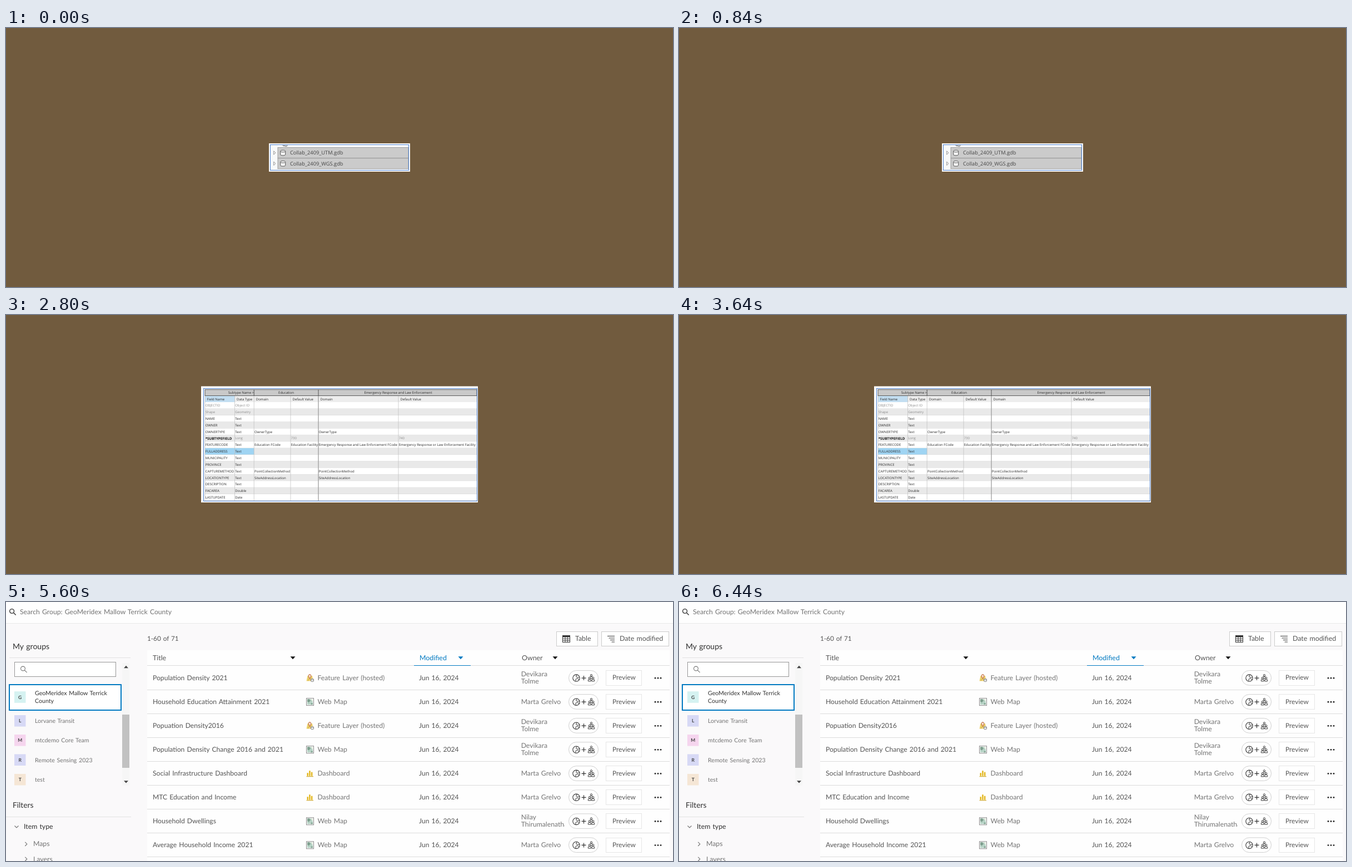
An HTML page for the animation above (7000 ms loop, 1200x467 px).

```html
<!DOCTYPE html>
<html lang="en">
<head>
<meta charset="utf-8">
<title>Geodatabase walkthrough</title>
<style>
html, body { margin: 0; width: 100%; height: 100%; overflow: hidden; background: #715b3e; }
svg { display: block; width: 1200px; height: 467px; }
text { white-space: pre; text-rendering: geometricPrecision; }
.ui { font-family: "Open Sans", "Noto Sans", sans-serif; }
.web { font-family: Lato, Inter, sans-serif; word-spacing: 1px; }
</style>
</head>
<body>
<svg id="stage" viewBox="0 0 1200 467"></svg>
<script>
const STEP = 1400;
const BLUE = '#4a7dcb', INK = '#2b2b2b';

const box = (x, y, x2, y2, fill, stroke = 'none', w = 1, r = 0) =>
  `<rect x="${x}" y="${y}" width="${x2 - x}" height="${y2 - y}" rx="${r}" fill="${fill}" stroke="${stroke}" stroke-width="${w}"/>`;
const path = (d, stroke = INK, w = 1, fill = 'none') =>
  `<path d="${d}" fill="${fill}" stroke="${stroke}" stroke-width="${w}"/>`;
const dot = (x, y, r, fill, stroke = 'none', w = 1) =>
  `<circle cx="${x}" cy="${y}" r="${r}" fill="${fill}" stroke="${stroke}" stroke-width="${w}"/>`;
// y is the middle of the capitals
const text = (x, y, s, size, fill = INK, more = '') =>
  `<text x="${x}" y="${y + size * 0.36}" font-size="${size}" fill="${fill}" ${more}>${s}</text>`;
const at = (x, y, inner) => `<g transform="translate(${x} ${y})">${inner}</g>`;
const lines = (xs, y, y2, color, w = 0.6) =>
  xs.map(x => path(`M${x} ${y}V${y2}`, color, w)).join('');

function cylinder(x, y, s = 1) {
  return at(x, y, `<g transform="scale(${s})">` +
    path('M-4.5 -3V3.2C-4.5 5.4 4.5 5.4 4.5 3.2V-3', '#555', 1, '#f4f4f4') +
    '<ellipse cy="-3" rx="4.5" ry="1.7" fill="#fff" stroke="#555"/></g>');
}

function fileList() {
  const row = (y, name) =>
    box(489, y - 9.6, 724, y + 9.4, '#cbcbcb', '#9b9b9b') +
    path(`M481.7 ${y - 3.2}V${y + 3.2}L485 ${y}Z`, '#8a8a8a', 0.9, '#fff') +
    cylinder(498.2, y) + text(511, y, name, 9.25, '#444');
  return box(473, 208, 727, 259, '#fff') +
    box(476, 211, 489, 256, '#f8f9f9') +
    path('M498.5 211V212.6H502M502 211V213.2H505.5V211', '#666', 1) +
    row(225, 'Collab_2409_UTM.gdb') + row(244.4, 'Collab_2409_WGS.gdb') +
    box(475.5, 210.5, 724.5, 256.5, 'none', BLUE);
}

function domainTable() {
  const cols = [365, 375, 494.5, 617, 660.5, 733, 768, 836];
  const heads = ['Domain Name', 'Description', 'Field Type', 'Domain Type', 'Split Policy', 'Merge Policy'];
  const rows = [
    ['Building General FCode', 'The type of residential facility'],
    ['Education FCode', 'The type of educational facility'],
    ['Emergency Response and Law Enforcement FCode', 'The type of emergency response or law|enforcement facility'],
    ['Government and Military FCode', 'The type of government or military facility'],
    ['Health and Medical FCode', 'The type of health or medical facility'],
    ['Mail and Shipping FCode', 'The type of mail or shipping facility'],
    ['OwnerType', 'The type of owner', 'Text', 'Duplicate'],
    ['PointCollectionMethod', 'The collection method for a point feature', 'Text', 'Duplicate'],
    ['Public Attractions and Landmark Structures FCode', 'The type of public attraction or landmark'],
    ['SiteAddressLocation', 'A general description of the physical location|represented by the site address point', 'Text', 'Duplicate'],
    ['Street Class', 'The street class for the road network', 'Short'],
    ['Street Rank', 'The street rank for the road network', 'Short'],
    ['Transportation Facilities FCode', 'The type of transportation facility']
  ];
  let out = box(359.5, 141.3, 841, 325, '#fff') + box(362.5, 144.5, 836.5, 322, '#efefef') +
    box(367.5, 149.5, 374.5, 156.5, '#dfe9df', '#8a9a94', 0.7) + path('M369 155L371 151L374 154', '#6f9c7c', 0.8) +
    text(377, 153.3, 'Map', 5.2) +
    box(398.5, 148, 487, 158, '#0a79cb') + box(363, 157.2, 836, 158.4, '#0a79cb') +
    box(401.5, 150, 405, 153.5, '#cfe3f3', '#fff', 0.5) + box(404, 152, 408, 156, '#b9d5ec', '#fff', 0.5) +
    text(410, 153.3, 'Domains: Collab_2409_UTM', 5, '#fff') +
    path('M479.8 151.3l4 4m0 -4l-4 4', '#fff', 0.8) +
    path('M372.6 164V167.2H369.4Z', 'none', 0, '#555');
  heads.forEach((h, i) => out += text(cols[i + 1] + 3, 164.4, h, 5.05));
  let y = 169.2;
  rows.forEach(([name, note, type = 'Text', split = 'Default'], i) => {
    const parts = note.split('|');
    const h = parts.length > 1 ? 15.9 : 9.93, mid = y + h / 2;
    out += box(365, y, 375, y + h, i ? '#ebebeb' : '#c9c9c9') +
      box(375, y, 836, y + h, i ? (i % 2 ? '#e9e9e9' : '#fff') : '#9fd4f3') +
      path(`M365 ${y + h}H836`, '#d0d0d0', 0.5) + text(375.8, mid, name, 5);
    parts.forEach((p, k) => out += text(495, mid + (k - (parts.length - 1) / 2) * 7, p, 5.02));
    [type, 'Coded Value Domain', split, 'Default'].forEach((s, k) => out += text(cols[k + 3] + 0.9, mid, s, 5));
    y += h;
  });
  return out + box(365, y, 836, 319.8, '#e9e9e9') + path('M365 319.8H836', '#c8c8c8', 0.6) +
    lines(cols.slice(0, 7), 159, 319.8, '#cbcbcb') +
    box(362.5, 144.5, 836.5, 322, 'none', BLUE);
}

function subtypeTable() {
  const cols = [358, 411.5, 446.2, 512, 562, 706];
  const faint = '#8c8c8c', h = 11.84, top = 157.2;
  const rows = [
    'OBJECTID,Object ID', 'Shape,Geometry', 'NAME,Text', 'OWNER,Text',
    'OWNERTYPE,Text,OwnerType,,OwnerType', '*SUBTYPEFIELD,Long,,730,,740',
    'FEATURECODE,Text,Education FCode,Education Facility,Emergency Response and Law Enforcement FCode,Emergency Response or Law Enforcement Facility',
    'FULLADDRESS,Text', 'MUNICIPALITY,Text', 'PROVINCE,Text',
    'CAPTUREMETHOD,Text,PointCollectionMethod,,PointCollectionMethod',
    'LOCATIONTYPE,Text,SiteAddressLocation,,SiteAddressLocation',
    'DESCRIPTION,Text', 'FACAREA,Double', 'LASTUPDATE,Date'
  ];
  let out = box(351, 128.5, 849, 338, '#fff') +
    box(358, 134.5, 847, 145.5, '#c9c9c9', '#5c5c5c', 1) + lines([446.2, 562], 134, 146, '#555', 1) +
    text(446, 139.8, 'Subtype Name &gt;', 6, INK, 'text-anchor="end"') +
    text(504, 139.8, 'Education', 6, INK, 'text-anchor="middle"') +
    text(705.5, 139.8, 'Emergency Response and Law Enforcement', 6, INK, 'text-anchor="middle"') +
    box(358, 146, 847, top, '#ededed') + box(358, 146, 411.5, top, '#c3def1');
  ['Field Name', 'Data Type', 'Domain', 'Default Value', 'Domain', 'Default Value']
    .forEach((s, i) => out += text(cols[i] + 3.6, 151.4, s, 6));
  rows.forEach((row, i) => {
    const y = top + i * h;
    out += box(358, y, 847, y + h, i % 2 ? '#e9e9e9' : '#fff');
    if (i === 7) out += box(358, y, 446.2, y + h, '#9fd4f3');
    out += path(`M358 ${y + h}H847`, '#c6c6c6', 0.6);
    row.split(',').forEach((s, k) => {
      const bold = s[0] === '*';
      const color = i < 2 || (i === 5 && !bold) ? faint : bold ? '#111' : INK;
      out += text(cols[k] + 0.7, y + h / 2, s, bold ? 6.25 : 6, color, bold ? 'font-weight="700"' : '');
    });
  });
  return out + lines(cols, 146, top + 15 * h, '#bdbdbd', 0.7) + lines([562], 146, 334.8, '#8f8f8f', 0.9) +
    box(355.5, 132.5, 847.5, 335.5, 'none', BLUE);
}

function tree() {
  // kind: d database, g group, a area, p points, l lines
  const rows = `d Collab_2409_UTM.gdb|g Broadband|a Vond|a Tulvex|p Data_Center|l RoadsCombinedCurrent|g Transit|p Orvane_Stops|l PotentialOnDemandRoute|p PotentialTransitStop|l Routes_Orvane|l Summer_Route|p Summer_Route_Stops|l Transit_FixedRoute|p Transit_FixedStops|l Transit_OnDemandRoute|l Transit_OnDemandRoute_ToBrenwick|p Transit_OnDemandStop|p Transit_OnDemandStop_ToBrenwick`.split('|');
  const frame = box(-5.2, -4.6, 5.2, 4.6, '#fbfcfc', '#666', 0.9, 1.2);
  const icons = {
    g: box(-5.5, -4.5, 0.5, 1, '#fff', '#555', 0.9) + box(-0.5, -2, 5.5, 3, '#fff', '#555', 0.9) + box(-3.5, 1, 1, 4.7, '#fff', '#555', 0.9),
    a: frame + box(-2.8, -2.4, 2.8, 2.4, '#ddd', '#555', 0.9) + path('M-2.8 0H0V-2.4M0 0V2.4', '#555', 0.7),
    p: frame + dot(-2.2, -1.5, 0.75, '#555') + dot(2.2, -1.2, 0.75, '#555') + dot(0, 1.9, 0.75, '#555'),
    l: frame + path('M-3.4 0.6H3.4M-3.4 0.6L-1 -2M3.4 0.6L1 2.6', '#555', 0.9)
  };
  let out = box(427, 69, 772.5, 398, '#fff') + box(430, 73, 770, 397, '#f7f9f9') +
    box(449.7, 74.3, 770, 90.8, '#c6dcee', '#5b9bd1');
  rows.forEach((row, i) => {
    const kind = row[0], y = 82.7 + i * 16.935;
    const x = kind === 'd' ? 458 : kind === 'g' ? 469.3 : 480.7;
    if ('dg'.includes(kind)) out += path(`M${x - 12} ${y - 2.6}V${y + 2.4}H${x - 17}Z`, 'none', 0, '#444');
    out += kind === 'd' ? cylinder(x, y, 0.9) : at(x, y, icons[kind]);
    out += text(x + 11.3, y, row.slice(2) + (kind === 'd' ? '' : '_NAD1983'), 8.02, '#444');
  });
  return out + box(430.5, 72.5, 770, 397, 'none', '#5f97d3');
}

function portal() {
  const ink = '#545454', mute = '#747474', dark = '#303030', rule = '#dcdcdc', link = '#0079c1';
  const group = 'GeoMeridex Mallow Terrick';
  const lens = (x, y, c, w) => dot(x, y, 3.9, 'none', c, w) + path(`M${x + 2.8} ${y + 2.8}l4.3 4.3`, c, w);
  const caret = (x, y, c = '#151515') => path(`M${x - 4.5} ${y - 2.2}h9l-4.5 5z`, 'none', 0, c);
  const chevron = d => path(d, mute, 1.1);

  const types = {
    'Feature Layer (hosted)': path('M-6.5 5.5L-4.5 -4L0 -3L4 -4L5.5 5.5Z', 'none', 0, '#ecd06a') +
      path('M-4 5L-1 1L3 3', '#c2a04a', 0.8) +
      path('M-0.5 1.5C-4.2 -3 -3 -6.5 -0.5 -6.5S3.2 -3 -0.5 1.5Z', '#b0663f', 0.9, '#f0b58f') + dot(-0.5, -3.6, 1.2, '#fff') +
      box(1.5, 1.5, 6.5, 6.5, '#fff', '#777', 0.9, 1.5) + path('M1.5 3.5H6.5', '#777', 0.8),
    'Web Map': box(-6.5, -6.5, 6.5, 6.5, '#fff', '#8a8a8a', 1) + box(-5, -5, 5, 5, '#b7d3c6') +
      path('M-5 -5H-1L1 -2L-2 1L-5 0ZM1 5L3 2L5 3V5Z', 'none', 0, '#7fa08f') + path('M1 -5L5 0V-5Z', 'none', 0, '#e4ecdf'),
    'Dashboard': box(-5.5, -1, -3, 4.5, '#e3b71f') + box(-1.8, -5, 0.7, 4.5, '#e3b71f') +
      box(1.9, -2.5, 4.4, 4.5, '#e3b71f') + path('M-6.5 5.5H6', '#c99d12', 1)
  };
  const person = (x, y) => dot(x, y, 1.7, '#fff', '#333', 1) +
    path(`M${x - 2.5} ${y + 5.6}V${y + 4}a2.5 2 0 0 1 5 0V${y + 5.6}Z`, '#333', 1, '#fff');
  const share = box(-26.5, -13, 26.5, 13.5, '#fff', '#cfcfcf', 1, 13.2) +
    dot(-13, 0.5, 6.2, '#fff', '#333', 1.1) +
    path('M-12 -5.5L-13.5 -2L-10.5 -0.5L-7 -1', '#333', 1) +
    path('M-14 6V2.5L-11 1L-8 3.5', '#333', 1) +
    path('M-3.5 0.5H4.5M0.5 -3.5V4.5', '#333', 1.2) +
    person(14, -4.3) + person(10.8, 0.5) + person(17.2, 0.5);

  const a = 'Devikara|Tolme', b = 'Marta Grelvo', c = 'Nilay|Thirumalenathan';
  const [layer, map, dash] = Object.keys(types);
  const items = [
    ['Population Density 2021', layer, a], ['Household Education Attainment 2021', map, b],
    ['Popuation Density2016', layer, a], ['Population Density Change 2016 and 2021', map, a],
    ['Social Infrastructure Dashboard', dash, b], ['MTC Education and Income', dash, b],
    ['Household Dwellings', map, c], ['Average Household Income 2021', map, b]
  ];

  let out = box(0, 0, 1200, 467, '#faf9fa') + box(0, 0, 1200, 39, '#fefefe') + path('M0 38.5H1200', '#e9e9e9') +
    lens(10.6, 16.5, '#333', 1.4) + text(25, 17.3, `Search Group: ${group} County`, 12.2, mute) +
    text(12, 79.5, 'My groups', 14, dark) + path('M6 100.5H224', '#e2e2e2') +
    box(15.5, 108.5, 197.5, 134.5, '#fff', '#979797') + lens(30.5, 120, mute, 1.1) +
    box(209, 110, 222, 331, '#f6f6f6') + box(209, 203, 222, 299, '#c1c1c1') +
    path('M212 119.2h8l-4 -4.4z', 'none', 0, '#444') + path('M212 322.2h8l-4 4.4z', 'none', 0, '#444') +
    box(6, 149, 207, 195, '#fff', link, 2) +
    text(52, 164.4, group, 10.6, dark) + text(52, 178.6, 'County', 10.6, dark);

  [['G', 171.5, '#d5f2f1'], ['L', 214.3, '#d7d9f5', 'Lorvane Transit'], ['M', 249.3, '#f5d5ee', 'mtcdemo Core Team'],
   ['R', 284.7, '#d7d9f5', 'Remote Sensing 2023'], ['T', 320.2, '#f5e6d5', 'test']].forEach(([k, y, fill, name = '']) => {
    out += box(15, y - 10.3, 35.5, y + 10.3, fill) +
      text(25.2, y, k, 8.5, '#444', 'text-anchor="middle" font-weight="700"') + text(52, y, name, 10.6, mute);
  });

  out += text(12, 366.5, 'Filters', 13.8, dark) + path('M0 387.5H225', '#e2e2e2') +
    chevron('M15.5 403.5l3.5 3.5l3.5 -3.5') + text(32, 404.6, 'Item type', 12.3, dark) +
    chevron('M34.3 432.8l3.5 3.6l-3.5 3.6') + text(49, 436, 'Maps', 12.3, mute) +
    chevron('M34.3 459.8l3.5 3.6l-3.5 3.6') + text(49, 463.3, 'Layers', 12.3, mute) +
    text(254, 66, '1-60 of 71', 11.7, ink) +
    box(990.5, 53.5, 1064.5, 79.5, '#fff', '#cbcbcb') + box(1071.5, 53.5, 1192.5, 79.5, '#fff', '#cbcbcb') +
    box(1001.5, 60.5, 1014.5, 72.5, '#fff', '#333') + box(1001.5, 60.5, 1014.5, 63.5, '#333') +
    path('M1001.5 66.5H1014.5M1001.5 69.5H1014.5M1006 62V72.5M1010.3 62V72.5', '#333', 0.9) +
    text(1024, 66, 'Table', 12.4, ink) +
    path('M1082 61.5H1095M1084.5 65H1095M1087 68.5H1095M1089.5 72H1095', '#333', 1.1) +
    text(1104, 66, 'Date modified', 12.4, ink) +
    box(254, 87, 1194, 467, '#fefefe') + path('M254 114.5H1194', rule) +
    text(264, 100.3, 'Title', 12.4, ink) + caret(516, 100.5) +
    text(744, 100.3, 'Modified', 12.4, link) + caret(818, 100.5, link) + path('M734 114.5H836', link) +
    text(928, 100.3, 'Owner', 12.4, ink) + caret(988, 100.5) +
    '<clipPath id="owner"><rect x="920" y="114" width="85" height="353"/></clipPath>';

  items.forEach(([title, type, owner], i) => {
    const y = 136.2 + i * 43.05, who = owner.split('|');
    out += text(264, y, title, 12.15, ink) + at(547, y + 0.8, types[type]) + text(560.5, y, type, 12.2, mute) +
      text(743, y, 'Jun 16, 2024', 12.1, ink) +
      '<g clip-path="url(#owner)">' +
      who.map((s, k) => text(926.7, y + (who.length > 1 ? k * 13.6 - 7 : 0), s, 12.2, mute)).join('') + '</g>' +
      at(1039, y + 0.4, share) +
      box(1079.5, Math.round(y - 13) + 0.5, 1143.5, Math.round(y + 13.5) + 0.5, '#fff', '#e6e6e6') + text(1091, y, 'Preview', 11.9, ink) +
      [1168, 1173, 1178].map(x => dot(x, y + 1, 1.4, '#222')).join('') +
      path(`M254 ${Math.round(y + 21.6) + 0.5}H1194`, rule);
  });
  return out;
}

const stage = document.getElementById('stage');
stage.innerHTML = box(0, 0, 1200, 467, '#715b3e') +
  [fileList, domainTable, subtypeTable, tree].map(f => `<g class="ui scene">${f()}</g>`).join('') +
  `<g class="web scene">${portal()}</g>`;
const scenes = [...stage.querySelectorAll('.scene')];

function update(ms) {
  const step = Math.floor(ms / STEP) % scenes.length;
  scenes.forEach((g, i) => {
    // the tree panel lies over the subtype table
    const on = i === step || (i === 2 && step === 3);
    g.style.display = on ? '' : 'none';
  });
}

const start = performance.now();
function tick() {
  update(performance.now() - start);
  requestAnimationFrame(tick);
}
tick();
</script>
</body>
</html>
```
